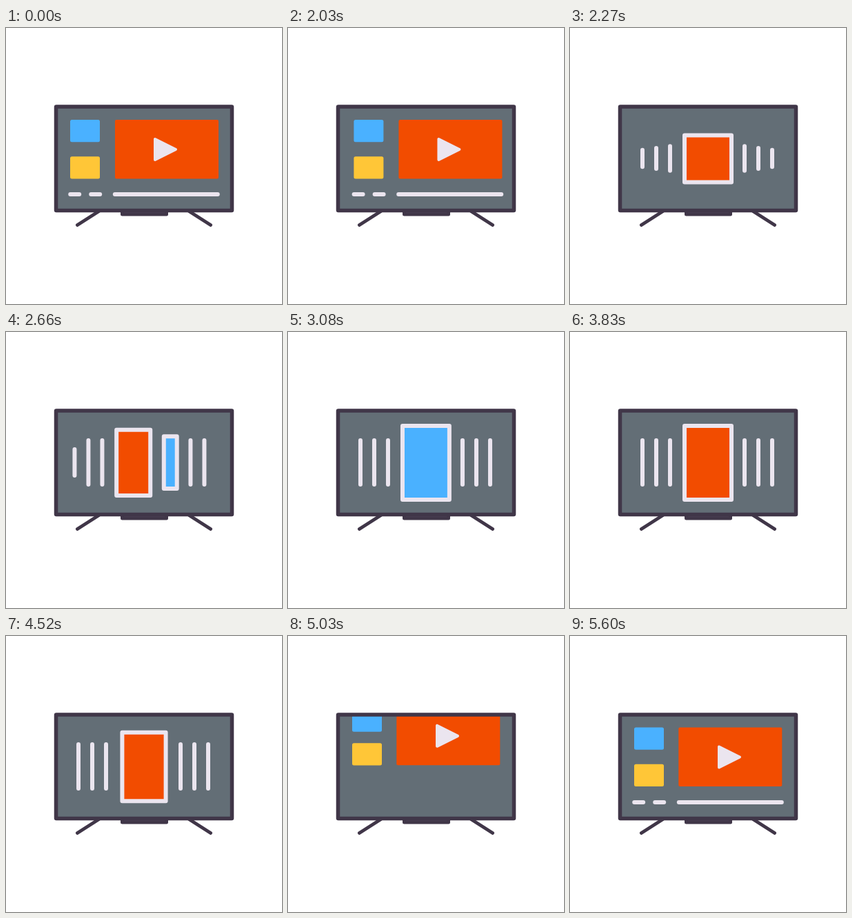
Write an HTML page that moves like this. It is 400 by 400 pixels and loops after 5.66 s.

```html
<!DOCTYPE html>
<html lang="en">
<head>
<meta charset="utf-8">
<title>Television</title>
<style>
html, body { margin: 0; width: 100%; height: 100%; overflow: hidden; background: #fff; }
svg { display: block; width: 100vw; height: 100vh; }
.line { stroke: #ebe5ef; stroke-width: 6; stroke-linecap: round; stroke-linejoin: round; }
.dark { stroke: #403648; stroke-linecap: round; stroke-linejoin: round; }
</style>
</head>
<body>
<svg viewBox="0 0 400 400">
  <defs><clipPath id="screen"><rect x="73" y="115" width="254" height="149"/></clipPath></defs>
  <path class="dark" fill="none" stroke-width="5" d="M134 266L103.500 285.500M266 266L296.500 285.500"/>
  <rect class="dark" x="168.500" y="264.500" width="64" height="5.500" fill="#50485a" stroke-width="5"/>
  <rect x="72" y="114" width="256" height="150" fill="#636e76"/>
  <g clip-path="url(#screen)">
    <g id="home">
      <rect id="blue" x="93" y="133" width="43" height="32.300" rx="2.500" fill="#4ab1ff"/>
      <rect id="yellow" x="93" y="186.300" width="43" height="32.300" rx="2.500" fill="#ffc637"/>
      <g id="video">
        <rect id="pane" x="158" y="133" width="150" height="85.500" rx="2" fill="#f24c00"/>
        <path d="M216 161V191L246 176Z" fill="#ebe5ef" stroke="#ebe5ef" stroke-width="4" stroke-linejoin="round"/>
      </g>
      <path id="dash1" class="line"/>
      <path id="dash2" class="line"/>
      <path id="track" class="line"/>
    </g>
    <g id="deck"></g>
  </g>
  <rect class="dark" x="72.500" y="114" width="255" height="150.500" rx="0.500" fill="none" stroke-width="5.500"/>
</svg>
<script>
const LOOP = 5660;
const COLORS = ['#f24c00', '#4ab1ff', '#ffc637', '#f24c00'];
const SLOTS = [105, 125, 145, 200, 253, 273, 293];
const CARD = 3;
const SWITCHES = [2552, 3062, 3572];
const HOME_IN = 4850;

const $ = id => document.getElementById(id);
const clamp = v => Math.max(0, Math.min(1, v));
const span = (t, start, dur) => clamp((t - start) / dur);
const mix = (a, b, p) => a + (b - a) * p;
const easeIn = p => p * p;
const easeOut = p => 1 - (1 - p) ** 3;
const easeBoth = p => p < .5 ? 4 * p ** 3 : 1 - 4 * (1 - p) ** 3;
const move = (el, x, y) => el.setAttribute('transform', `translate(${x} ${y})`);
const show = (el, on) => el.setAttribute('visibility', on ? 'inherit' : 'hidden');

const items = Array.from({ length: 8 }, () => {
  const el = document.createElementNS('http://www.w3.org/2000/svg', 'path');
  el.setAttribute('class', 'line');
  $('deck').append(el);
  return el;
});

// w and h are outer sizes, including the 6px outline
function box(el, x, y, w, h, fill) {
  show(el, h > .5);
  const a = Math.max(0, w - 6) / 2, b = Math.max(.01, h - 6) / 2;
  el.setAttribute('d', `M${x - a} ${y - b}H${x + a}V${y + b}H${x - a}Z`);
  el.setAttribute('fill', fill);
  el.setAttribute('stroke-width', Math.min(6, h));
}

function dash(id, mid, width, p) {
  const half = Math.max(.01, width * p - 6) / 2;
  show($(id), p > 0);
  $(id).setAttribute('d', `M${mid - half} 241H${mid + half}`);
}

function drawHome(t) {
  const entering = t >= HOME_IN;
  move($('home'), entering ? 0 : 240 * easeIn(span(t, 2015, 160)), 0);
  const drop = (start, from) => entering ? mix(from, -.5, easeOut(span(t, start, 500))) : 0;
  const grow = start => entering ? easeOut(span(t, start, 460)) : 1;
  move($('yellow'), 0, drop(4860, -108));
  move($('blue'), 0, drop(4920, -56));
  move($('video'), 0, drop(4860, -108));
  move($('pane'), entering ? -.7 : 0, 0);
  dash('dash1', 99.7, 19, grow(5080));
  dash('dash2', 129.7, 19, grow(5110));
  dash('track', 232.3, 155, grow(5140));
}

function drawDeck(t) {
  const n = SWITCHES.filter(s => t >= s).length;
  let p = n ? easeBoth(span(t, SWITCHES[n - 1], 265)) : 0;
  let turn = n - 1;
  if (p === 1 || !n) { p = 0; turn = n; }
  items.forEach((el, k) => {
    if (k === 0) return box(el, 105 - 20 * p, 189, 6, 70 * scaleAt(0, t) * clamp(1 - p / .75), 'none');
    if (k === 7) return box(el, 293, 189, 6, 70 * clamp((p - .3) / .7), 'none');
    const to = k - 1;
    const x = mix(SLOTS[k], SLOTS[to], p);
    const big = k === CARD ? 1 - p : k === CARD + 1 ? p : 0;
    const color = COLORS[k === CARD ? turn : Math.min(3, turn + 1)];
    const open = scaleAt(k, t);
    const press = k === CARD ? mix(1, .935, easeBoth(span(t, 4300, 220))) : 1;
    const lift = k === CARD ? -150 * easeIn(span(t, 4530, 290)) : 0;
    box(el, x, mix(189, 189.5, big) + lift, mix(6, 74 * press, big),
      mix(70, 113, big) * press * open, color);
  });
}

// Opening and closing of each slot, spreading outward from the card
function scaleAt(k, t) {
  const far = Math.abs(k - CARD);
  const open = easeOut(span(t, 2172 + 14 * far, 330));
  return far ? open * (1 - easeIn(span(t, 4540 + 25 * far, 200))) : open;
}

function draw(t) {
  const home = t < 2175 || t >= HOME_IN;
  const deck = t >= 2172 && t < HOME_IN;
  show($('home'), home);
  $('deck').setAttribute('display', deck ? 'inline' : 'none');
  $('home').setAttribute('display', home ? 'inline' : 'none');
  if (home) drawHome(t);
  if (deck) drawDeck(t);
}

const begin = performance.now();
function tick() {
  draw((performance.now() - begin) % LOOP);
  requestAnimationFrame(tick);
}
tick();
</script>
</body>
</html>
```
